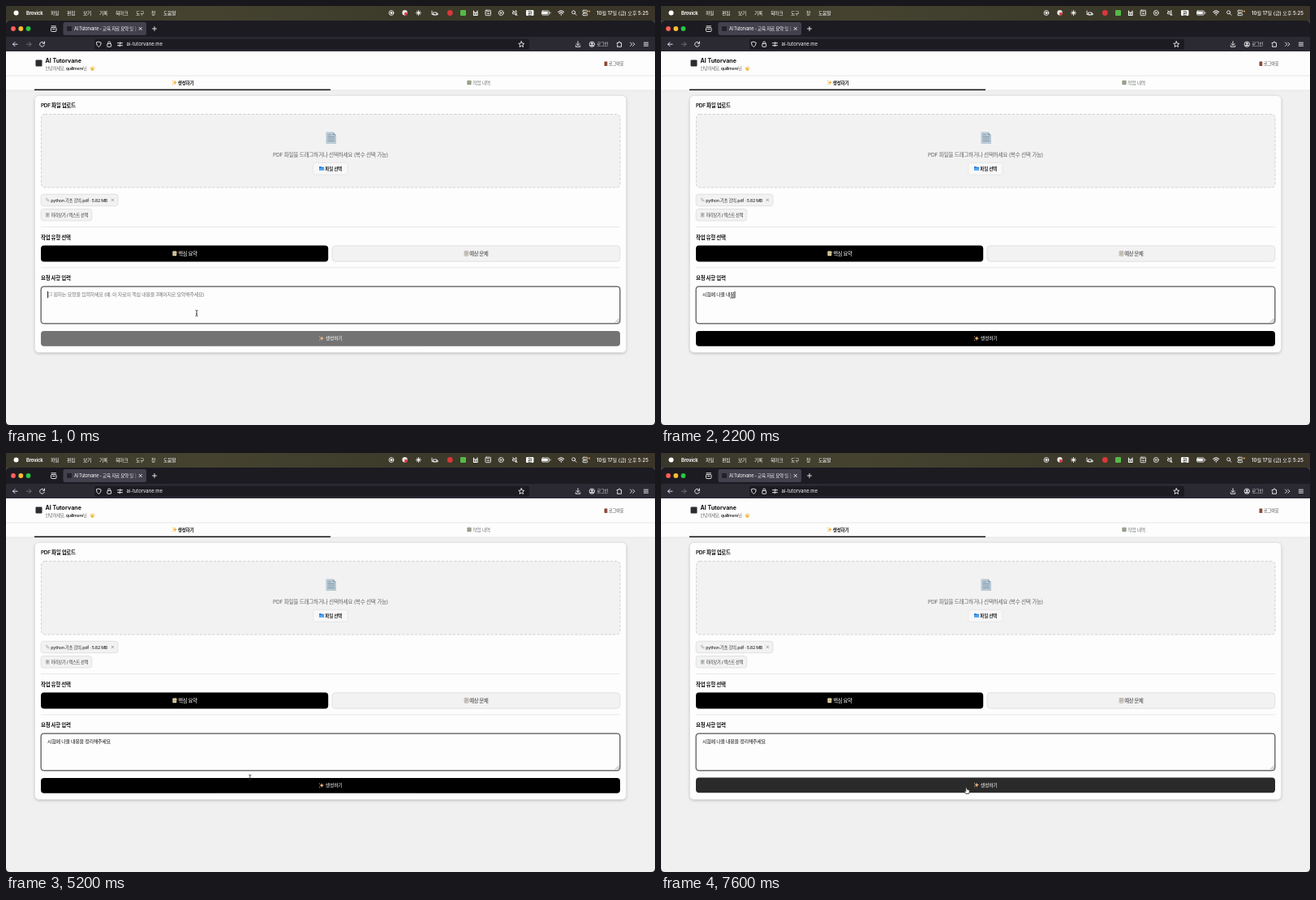
Animation of 800 by 517 pixels, one loop 7.7 s. Source, as an HTML page:

```html
<!DOCTYPE html>
<html lang="ko">
<head>
<meta charset="utf-8">
<title>AI Tutorvane</title>
<style>
html, body { margin: 0; width: 100%; height: 100%; overflow: hidden; background: #24231c; }
svg { display: block; width: 800px; height: 517px; }
text { font-family: Inter, 'Noto Sans CJK KR', 'Noto Sans CJK', sans-serif; letter-spacing: -.05em; white-space: pre; }
.latin { letter-spacing: 0; }
.mid { text-anchor: middle; }
.b { font-weight: 600; }
.line { fill: none; stroke: #f2f2f2; stroke-width: .9; stroke-linecap: round; stroke-linejoin: round; }
.box { fill: #f2f2f2; stroke: #dcdcdc; stroke-width: .8; }
</style>
</head>
<body>
<svg viewBox="0 0 800 517">
  <defs>
    <linearGradient id="bar"><stop stop-color="#38372a"/><stop offset=".3" stop-color="#454330"/><stop offset=".65" stop-color="#3b3a2a"/><stop offset="1" stop-color="#3a3528"/></linearGradient>
    <linearGradient id="fade" gradientUnits="userSpaceOnUse" x1="84" x2="161"><stop offset=".88" stop-color="#fbfbfe"/><stop offset="1" stop-color="#fbfbfe" stop-opacity=".25"/></linearGradient>
    <clipPath id="tab"><rect x="84" y="20" width="76.5" height="16"/></clipPath>
    <filter id="soft" x="-5%" y="-5%" width="110%" height="115%"><feDropShadow dx="0" dy="1.2" stdDeviation="1.8" flood-opacity=".2"/></filter>
    <g id="spark">
      <path d="M3.4 .2 4.2 2.3 6.2 3.1 4.2 3.9 3.4 6 2.6 3.9 .5 3.1 2.6 2.3Z"/>
      <path d="M.9 0 1.2 .7 1.9 1 1.2 1.3 .9 2 .6 1.3 0 1 .6 .7ZM1 4.2 1.3 4.9 2 5.2 1.3 5.5 1 6.2 .7 5.5 0 5.2 .7 4.9Z"/>
    </g>
    <g id="sheet">
      <rect x=".6" y=".2" width="4.8" height="5.8" rx=".5"/>
      <path d="M1.6 1.7H4.5M1.6 3H4.5M1.6 4.3H3.6" stroke="#777" stroke-width=".5"/>
    </g>
  </defs>

  <!-- menu bar -->
  <rect width="800" height="20" fill="url(#bar)"/>
  <circle cx="12.5" cy="8.4" r="3" fill="#fff"/>
  <g id="menu" fill="#fff" font-size="5.9" font-weight="500">
    <text x="25" y="10.6" class="latin" font-weight="700" font-size="5.6">Brovick</text>
  </g>
  <g class="line">
    <circle cx="475" cy="8.5" r="2.9"/><circle cx="475" cy="8.5" r="1.1" fill="#fff"/>
    <path d="M508.500 5.500V11.500M505.500 8.500H511.500M506.400 6.400 510.600 10.600M510.600 6.400 506.400 10.600"/>
    <path d="M525 6V10.500H529M527 8H531V11H527Z"/>
    <path d="M576.500 6V11.500H581V6M576.500 8H581M578.800 8V11" stroke-width="1.200"/>
    <rect x="591" y="5.200" width="6.500" height="6.500" rx="1"/><path d="M592.500 7H596M593 9.500H596"/>
    <circle cx="610.300" cy="8.500" r="3"/><path d="M609.500 7.200 611.600 8.500 609.500 9.800Z" fill="#fff" stroke-width=".3"/>
    <path d="M625 7.500H626.500L629 5.500V11.500L626.500 9.700H625ZM624.800 5.500 630 11.500"/>
    <rect x="660.500" y="6" width="9" height="5" rx="1.300"/><path d="M662 8.500H667" stroke-width="2.800"/><path d="M671 8V9"/>
    <path d="M680.800 7.400Q684.200 4.500 687.600 7.400M682.200 9Q684.200 7.300 686.200 9" stroke-width="1.200"/>
    <circle cx="684.200" cy="10.800" r=".4"/>
    <circle cx="699.600" cy="7.800" r="2"/><path d="M701.200 9.400 703 11.200"/>
    <rect x="710.800" y="5.300" width="6" height="2.500" rx="1.200"/><rect x="710.800" y="9.200" width="6" height="2.500" rx="1.200"/>
  </g>
  <circle cx="491.600" cy="8.300" r="3.200" fill="#e9e4e4"/><circle cx="493" cy="9.700" r="1.900" fill="#e0353c"/>
  <circle cx="531.500" cy="10" r="1.300" fill="#ddd"/>
  <circle cx="547.300" cy="8.500" r="3.400" fill="#d8383b"/>
  <rect x="560" y="5" width="7" height="7" rx="1" fill="#55b948"/>
  <circle cx="719" cy="6.500" r="1.100" fill="#e99a31"/>
  <rect x="641" y="5" width="9.500" height="7" rx="1.200" fill="#f4f4f0"/>
  <text x="645.700" y="10.600" class="mid b" font-size="5.500" fill="#333">한</text>
  <text x="728" y="10.600" class="latin" font-size="6.050" font-weight="500" fill="#fff">10월 17일 (금) 오후 5:25</text>

  <!-- browser window -->
  <path d="M0 22Q0 18 4 18H796Q800 18 800 22V512Q800 517 795 517H5Q0 517 0 512Z" fill="#f0f0f0"/>
  <path d="M0 38V22Q0 18 4 18H796Q800 18 800 22V38Z" fill="#1c1b22"/>
  <rect y="38" width="800" height="18.500" fill="#2b2a33"/>
  <circle cx="9" cy="28" r="2.900" fill="#ff5f57"/><circle cx="18.300" cy="28" r="2.900" fill="#febc2e"/><circle cx="27.500" cy="28" r="2.900" fill="#28c840"/>
  <rect x="70.500" y="20" width="102.500" height="16" rx="2.200" fill="#42414d"/>
  <rect x="75" y="25" width="6" height="6" rx=".8" fill="#22222a"/>
  <g clip-path="url(#tab)"><text x="84" y="30" font-size="5.600" fill="url(#fade)">AI Tutorvane - 교육 자료 요약 및 문</text></g>
  <rect x="109" y="40.700" width="536" height="13" rx="2.200" fill="#1c1b22"/>
  <g class="line">
    <rect x="55.500" y="26.500" width="6.500" height="5" rx="1"/><path d="M56 24.800H61.500M57.500 28.500H60"/>
    <path d="M164 26.300 167.400 29.700M167.400 26.300 164 29.700M180.500 28H185.500M183 25.500V30.500"/>
    <path d="M14 47.200H8.500M11 44.700 8.500 47.200 11 49.700"/>
    <path d="M25.500 47.200H31M28.500 44.700 31 47.200 28.500 49.700" stroke="#777681"/>
    <path d="M47.200 46A2.900 2.900 0 1 0 47.300 48.300M47.500 44V46.300H45.200"/>
    <path d="M114.300 44.200 117.200 45.200Q117.200 49 114.300 50.600 111.400 49 111.400 45.200Z"/>
    <rect x="124.800" y="46.500" width="4.800" height="3.800" rx=".6"/><path d="M125.700 46.500V45.300Q125.700 44 127.200 44T128.700 45.300V46.500"/>
    <path d="M137.500 45.700H139.500M142 45.700H143.500M137.500 48.700H139M141.500 48.700H143.500"/><circle cx="140.700" cy="45.700" r=".9"/><circle cx="140.200" cy="48.700" r=".9"/>
    <path d="M635.300 43.700 636.300 46.100 638.800 46.300 636.900 48 637.500 50.500 635.300 49.200 633.100 50.500 633.700 48 631.800 46.300 634.300 46.100Z"/>
    <path d="M705 43.700V48.300M703 46.500 705 48.500 707 46.500M702.300 48.800V50.300H707.700V48.800"/>
    <circle cx="722.300" cy="47.200" r="3.200"/><circle cx="722.300" cy="46.300" r=".9" fill="#fff"/><path d="M720.600 49Q722.300 47.600 724 49" stroke-width="1.200"/>
    <path d="M753.500 45.500H755V44.500Q756 43.500 757 44.500V45.500H758.500V50.300H753.500V48.700Q755.300 48 753.500 47Z"/>
    <path d="M769.500 45 771.700 47.200 769.500 49.400M772.700 45 774.900 47.200 772.700 49.400M786.300 45.200H791.500M786.300 47.200H791.500M786.300 49.200H791.500"/>
  </g>
  <text x="148.500" y="49.200" class="latin" font-size="5.900" fill="#fbfbfe">ai-tutorvane.me</text>
  <text x="728.500" y="49.200" font-size="5.200" fill="#fbfbfe">로그인</text>

  <!-- page header -->
  <rect y="56" width="800" height="48" fill="#fdfdfd"/>
  <path d="M0 86H800M0 104H800" stroke="#e3e3e3" stroke-width=".8"/>
  <rect x="36.500" y="66.500" width="8" height="8" rx="1" fill="#2b2b30"/>
  <text x="48.500" y="70" class="latin" font-size="7.100" font-weight="700" fill="#111">AI Tutorvane</text>
  <text x="48.500" y="79.400" font-size="5.250" fill="#666">안녕하세요, <tspan class="b" fill="#333">quillmere</tspan>님</text>
  <g fill="#f4b942"><circle cx="106.500" cy="78.200" r="1.800"/><path d="M104.500 77.500 105 75.500M106.300 76.500 107 75M107.800 77.500 108.800 75.800" stroke="#f4b942" stroke-linecap="round"/></g>
  <rect x="737.500" y="68.500" width="3.800" height="5.500" rx=".4" fill="#8b4638"/><circle cx="740.300" cy="71.300" r=".4" fill="#f0c060"/>
  <text x="743" y="73.200" font-size="5.250" font-weight="500" fill="#444">로그아웃</text>
  <rect x="35" y="102.600" width="365" height="1.500" fill="#111"/>
  <use href="#spark" x="204.800" y="91.400" fill="#f5ae35"/>
  <text x="211.800" y="96.600" class="b" font-size="5.600" fill="#111">생성하기</text>
  <rect x="568.500" y="92" width="5" height="5" rx=".5" fill="#7f8b70"/><path d="M569.500 93.500H572.500M569.500 95.300H572.500" stroke="#ddd" stroke-width=".6"/>
  <text x="575.300" y="96.600" font-size="5.800" fill="#777">작업 내역</text>

  <!-- card -->
  <rect x="35.500" y="110.500" width="729" height="317" rx="5" fill="#fdfdfd" stroke="#dedede" stroke-width=".7" filter="url(#soft)"/>
  <g class="b" font-size="6.500" fill="#111">
    <text x="43" y="125.400">PDF 파일 업로드</text>
    <text x="43" y="288.200">작업 유형 선택</text>
    <text x="43" y="338.300">요청 사항 입력</text>
  </g>
  <path d="M43 272.600H757M43 322.900H757" stroke="#e2e2e2" stroke-width=".8"/>
  <rect x="43.500" y="133.500" width="713.500" height="90.500" rx="4.500" fill="#f2f2f2" stroke="#d2d2d2" stroke-dasharray="3.200 2"/>
  <path d="M394.500 155.500H403L407 159.500V170H394.500Z" fill="#b9c9d4"/>
  <path d="M403 155.500V159.500H407Z" fill="#8ea6b6"/>
  <path d="M396.500 159H401M396.500 161.500H405M396.500 164H405M396.500 166.500H405" stroke="#7b95a7" stroke-width=".9"/>
  <text x="400" y="185.600" class="mid" font-size="6.700" fill="#666">PDF 파일을 드래그하거나 선택하세요 (복수 선택 가능)</text>
  <rect x="378.700" y="193.300" width="42.600" height="15" rx="3" fill="#f8f8f8" stroke="#e3e3e3" stroke-width=".8"/>
  <path d="M386 198H388.500L389.200 198.800H392V203H386Z" fill="#2f7fd6"/><path d="M386.500 200H392.400L391.800 203H386Z" fill="#57a8ef"/>
  <text x="393.300" y="202.800" class="b" font-size="5.600" fill="#222">파일 선택</text>

  <rect class="box" x="43.200" y="232.300" width="94.800" height="14.400" rx="3"/>
  <path d="M49 237.300 52.800 241.200Q53.800 240.500 52.800 239.500L50.300 237.100M49.500 239 51.500 241" class="line" style="stroke:#a9b0b6;stroke-width:.8"/>
  <text x="55.300" y="241.500" font-size="5.400" font-weight="500" fill="#333">python 기초 강의.pdf · 5.82 MB</text>
  <path d="M129.900 237.900 132.900 240.900M132.900 237.900 129.900 240.900" stroke="#666" stroke-width=".6"/>
  <rect class="box" x="43.200" y="250.500" width="62.600" height="14.500" rx="3"/>
  <use href="#sheet" x="48.200" y="254.700" fill="#c5cdd3"/>
  <text x="55.500" y="259.800" font-size="5.200" font-weight="500" fill="#333">미리보기 / 텍스트 선택</text>

  <rect x="43" y="295.500" width="354.200" height="20" rx="4"/>
  <use href="#sheet" x="204.800" y="302.300" fill="#efe2b8"/><path d="M208 307 211 303.500" stroke="#e79a3c"/>
  <text x="212.200" y="307.600" font-size="6.300" font-weight="500" fill="#fff">핵심 요약</text>
  <rect class="box" x="402" y="295.800" width="354.800" height="19.400" rx="4"/>
  <use href="#sheet" x="564.500" y="302.300" fill="#e2ddd2" stroke="#8c8478" stroke-width=".5"/>
  <text x="571.300" y="307.600" font-size="6.300" font-weight="500" fill="#333">예상 문제</text>

  <rect x="43" y="346" width="714" height="46" rx="3.500" fill="#fdfdfd" stroke="#d9d9d9" stroke-width="2"/>
  <rect x="43.200" y="346.200" width="713.600" height="45.600" rx="3.500" fill="#fdfdfd" stroke="#333" stroke-width=".9"/>
  <path d="M751 390.500 756 385.500M753.500 390.500 756 388" stroke="#777" stroke-width=".7"/>
  <g id="hint">
    <path d="M52 353.700H56.500V357.500H54L52.500 358.800V357.500H52Z" fill="#f4f4f4" stroke="#aaa" stroke-width=".6"/>
    <text x="58.500" y="358.300" font-size="6.100" fill="#757575">원하는 요청을 입력하세요 (예: 이 자료의 핵심 내용을 3페이지로 요약해주세요)</text>
  </g>
  <text id="typed" x="51" y="358.300" font-size="6.060" fill="#111"></text>
  <rect id="under" y="359.600" height=".8"/>
  <rect id="caret" y="352" width=".8" height="8.300"/>

  <g id="go">
    <rect id="goBox" x="43" y="401" width="714" height="18.800" rx="4"/>
    <use href="#spark" x="385.800" y="407" fill="#f3b580"/>
    <text x="393.700" y="412.400" font-size="6" font-weight="500" fill="#fff">생성하기</text>
  </g>

  <path id="beam" d="M-1.500 -3.500Q0 -3.500 0 -2.500Q0 -3.500 1.500 -3.500M0 -2.500V2.500M-1.500 3.500Q0 3.500 0 2.500Q0 3.500 1.500 3.500M-.8 .8H.8" fill="none" stroke="#222" stroke-width=".8"/>
  <path id="hand" d="M-1.600 -3.800Q-.8 -4.500 -.3 -3.500L.3 -1.300Q1 -1.700 1.500 -1 2.200 -1.300 2.500 -.6 3.300 -.7 3.300 .2L3 2.300 2.400 4H-1L-3 1.300Q-3.300 .2 -2.200 .4L-1.200 1.200Z" fill="#fff" stroke="#111" stroke-width=".7" stroke-linejoin="round"/>
</svg>
<script>
const LOOP = 7700, BLINK = 567, FIRST_KEY = 400, LAST_KEY = 4400;
const $ = id => document.getElementById(id);
const show = (el, on) => el.setAttribute('visibility', on ? 'visible' : 'hidden');
const clamp = v => Math.max(0, Math.min(1, v));

// what the input method shows after each key, in groups sharing a prefix
const groups = [
  ['', 'ㅅ,시,싷,시허,시험,시험ㅇ,시험에,시험에 '],
  ['시험에 ', 'ㄴ,나,낭,나오,나올,나올 '],
  ['시험에 나올 ', 'ㄴ,내,냉,내요,내용,내용ㅇ,내용으,내용을,내용을 '],
  ['시험에 나올 내용을 ', 'ㅈ,저,정,정ㄹ,정리,정맇,정리해,정리핮,정리해주,정리해줏,정리해주세,정리해주셍,정리해주세요']
];
const states = groups.flatMap(([head, tails]) => tails.split(',').map(tail => head + tail));
const keyTimes = [[FIRST_KEY, 0], [800, 4], [2200, 18], [3500, 26], [LAST_KEY, 35]];
const moveX = [[5000, 235], [5400, 366], [5800, 374], [6700, 377]];
const moveY = [[5000, 379], [5400, 422], [5800, 420], [6700, 416.5]];

function at(points, t) {
  if (t <= points[0][0]) return points[0][1];
  for (let i = 1; i < points.length; i++) {
    const [t0, a] = points[i - 1], [t1, b] = points[i];
    if (t < t1) return a + (b - a) * (t - t0) / (t1 - t0);
  }
  return points[points.length - 1][1];
}

for (const [x, label] of [[55, '파일'], [75, '편집'], [95, '보기'], [115, '기록'], [135, '북마크'], [160, '도구'], [179, '창'], [194, '도움말']])
  $('menu').insertAdjacentHTML('beforeend', `<text x="${x}" y="10.6">${label}</text>`);

function draw(now) {
  const t = now % LOOP;
  const typing = t >= FIRST_KEY;
  const text = typing ? states[Math.floor(at(keyTimes, t) + 1e-6)] : '';
  const typed = $('typed');
  typed.textContent = text;
  const width = text ? typed.getComputedTextLength() : 0;
  const composing = typing && t < 4950 && !text.endsWith(' ');
  const last = composing ? typed.getSubStringLength(text.length - 1, 1) : 0;

  show($('hint'), !typing);
  show($('under'), composing);
  $('under').setAttribute('x', 51 + width - last);
  $('under').setAttribute('width', last);
  show($('caret'), t < LAST_KEY || Math.floor((t - LAST_KEY) / BLINK) % 2 === 0);
  $('caret').setAttribute('x', 51 + width);

  const x = at(moveX, t), y = at(moveY, t);
  const over = y > 401;
  show($('beam'), !typing || (t >= 5000 && !over));
  show($('hand'), over);
  for (const id of ['beam', 'hand']) $(id).setAttribute('transform', `translate(${x} ${y})`);

  const hover = clamp((t - 5220) / 200);
  const grey = Math.round(115 * (1 - clamp((t - FIRST_KEY) / 200)) + 42 * hover);
  $('goBox').setAttribute('fill', `rgb(${grey},${grey},${grey})`);
  $('go').setAttribute('transform', `translate(0 ${-.5 * hover})`);
}

const start = performance.now();
(function tick() {
  draw(performance.now() - start);
  requestAnimationFrame(tick);
})();
</script>
</body>
</html>
```
